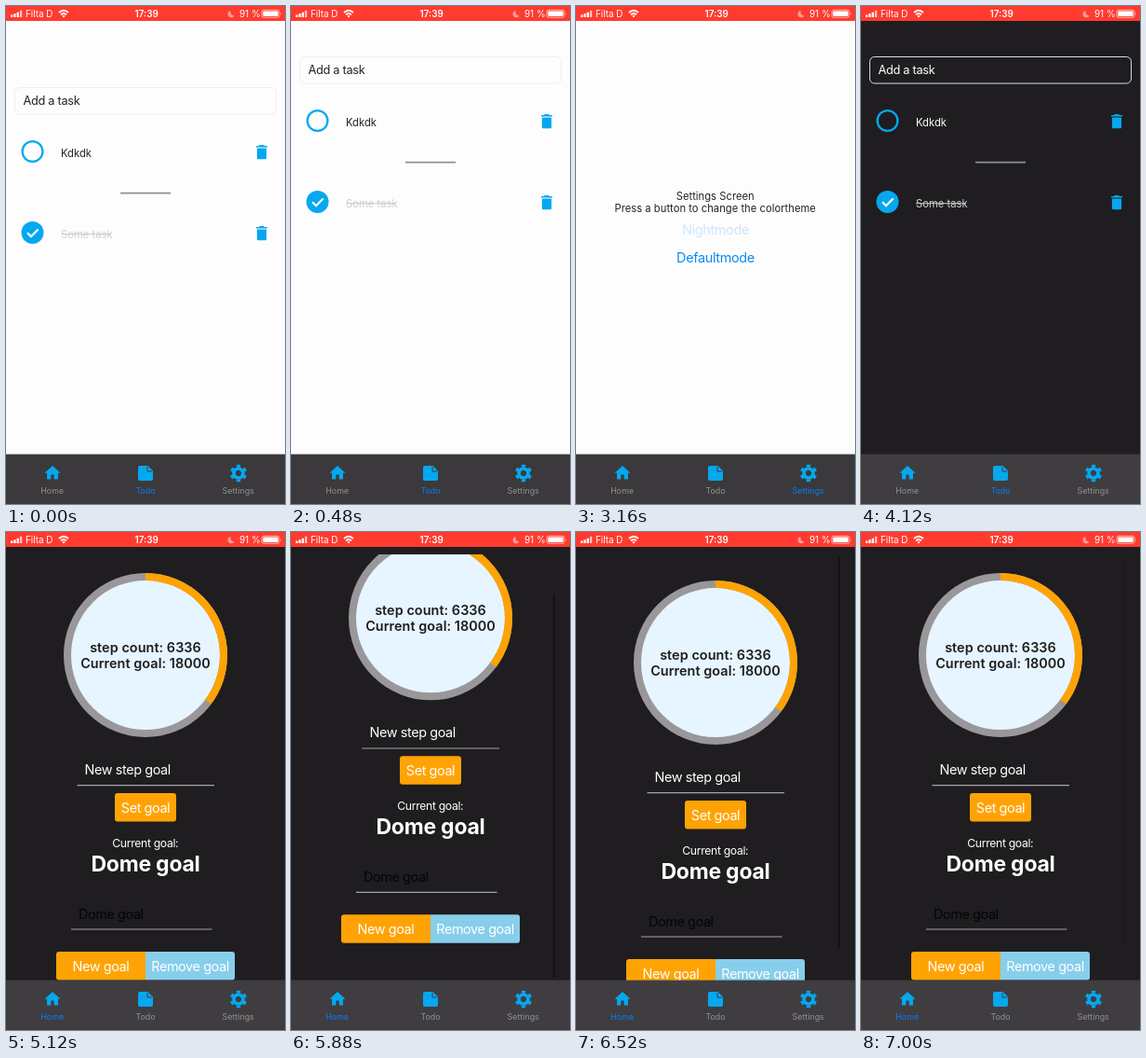
An HTML page that plays this animation: 300 by 534 pixels, repeating every 7080 ms.

```html
<!DOCTYPE html>
<html lang="en">
<head>
<meta charset="utf-8">
<title>Todo and step goals</title>
<style>
  html, body { margin: 0; width: 100%; height: 100%; overflow: hidden; }
  svg { display: block; width: 100vw; height: 100vh;
        font-family: Inter, "Liberation Sans", sans-serif; letter-spacing: -.02em;
        --bg: #fefdfe; --ink: #232225; --bar: #3b393b; --line: #ededf1; --icon: #05a8ef; }
  svg.dark { --bg: #1f1d20; --ink: #fff; --bar: #3f3d40; --line: #dcdcdf; }
  .bg { fill: var(--bg); }
  .ink { fill: var(--ink); }
  .icon { fill: var(--icon); }
  .mid { text-anchor: middle; }
  .small { font-size: 11.2px; letter-spacing: .003em; }
  .field { font-size: 12.8px; }
  .big { font-size: 14.4px; letter-spacing: -.027em; }
  .link { font-size: 14.4px; fill: #088bf2; }
  .steps { font-size: 14.4px; font-weight: 600; letter-spacing: .004em; fill: #1d1c1e; }
  .title { font-size: 23px; font-weight: 700; letter-spacing: -.01em; }
  .tab { font-size: 8.9px; letter-spacing: 0; fill: #929093; }
  .tab.on { fill: #0a7cf5; }
  .status { font-size: 9.9px; letter-spacing: 0; fill: #fff; }
  .clock { font-weight: 600; }
</style>
</head>
<body>
<svg id="app" viewBox="0 0 300 534">
  <defs>
    <path id="trash" class="icon" transform="scale(.85)"
      d="M6 19c0 1.1.9 2 2 2h8c1.1 0 2-.9 2-2V7H6zM19 4h-3.5l-1-1h-5l-1 1H5v2h14z"/>
    <clipPath id="view"><path d="M0 24h300v458H0z"/></clipPath>
  </defs>
  <rect class="bg" width="300" height="534"/>

  <g id="todo">
    <rect x="9.5" y="54.5" width="281" height="28.5" rx="5" fill="none" stroke="var(--line)"/>
    <text class="field ink" x="18.5" y="73">Add a task</text>
    <circle cx="28.5" cy="123" r="10.9" fill="none" stroke="var(--icon)" stroke-width="2.3"/>
    <text class="small ink" x="59" y="128.5">Kdkdk</text>
    <use href="#trash" x="264.8" y="113.5"/>
    <path d="M123 167.6h54" stroke="#8f8f93" stroke-width="1.8"/>
    <circle class="icon" cx="28.5" cy="210" r="12"/>
    <path d="M23 210.3l4 4 7.6-7.8" fill="none" stroke="#fff" stroke-width="2.2"/>
    <text class="small" x="59" y="215.5" fill="#d0d0d2">Some task</text>
    <path d="M59 211.7h54" stroke="#c9c9cb"/>
    <use href="#trash" x="264.8" y="200.5"/>
  </g>

  <g id="settings" class="mid">
    <text class="small ink" x="149.7" y="207.5">Settings Screen</text>
    <text class="small ink" x="149.7" y="221">Press a button to change the colortheme</text>
    <text id="night" class="link" x="150" y="244.5">Nightmode</text>
    <text class="link" x="150" y="274.5">Defaultmode</text>
  </g>

  <g id="home" clip-path="url(#view)">
    <g id="page">
      <circle cx="150" cy="132" r="84" fill="#e6f5ff" stroke="#999799" stroke-width="8"/>
      <circle cx="150" cy="132" r="84" fill="none" stroke="#ffa305" stroke-width="8"
        pathLength="18000" stroke-dasharray="6336 18000" transform="rotate(-90 150 132)"/>
      <g class="mid steps">
        <text x="150" y="128.7">step count: 6336</text>
        <text x="150" y="146">Current goal: 18000</text>
      </g>
      <text class="big" x="84.5" y="260" fill="#fff">New step goal</text>
      <path d="M76.5 271.6h147.5M70 426h151.5" stroke="#a5a4a6" stroke-width="1.1"/>
      <rect x="117" y="280" width="66" height="30.5" rx="3" fill="#ffa305"/>
      <path d="M57 450h93v30.5H57q-3 0-3-3V453q0-3 3-3z" fill="#ffa305"/>
      <path d="M150 450h93q3 0 3 3v24.500q0 3-3 3h-93z" fill="#87ceeb"/>
      <g class="mid big" fill="#fff">
        <text x="150" y="301">Set goal</text>
        <text x="102" y="471">New goal</text>
        <text x="198" y="471">Remove goal</text>
      </g>
      <text class="mid" x="149.8" y="338" font-size="12.2" fill="#fff">Current goal:</text>
      <text class="mid title" x="150" y="364" fill="#fff">Dome goal</text>
      <text class="big" x="78" y="414.5" fill="#050406">Dome goal</text>
    </g>
    <rect id="thumb" x="281.8" width="2.2" rx="1.1" fill="#141215"/>
  </g>

  <rect y="480.6" width="300" height="54" fill="var(--bar)"/>
  <path class="icon" transform="translate(39.8 490.5) scale(.85)" d="M10 20v-6h4v6h5v-8h3L12 3 2 12h3v8z"/>
  <path class="icon" d="M144 493h8.5l5.500 5.500v8.500q0 2-2 2h-12q-2 0-2-2v-12q0-2 2-2z"/>
  <path d="M152 494v5h5" fill="none" stroke="var(--bar)"/>
  <g transform="translate(250 501) rotate(15)" fill="none" stroke="var(--icon)">
    <circle r="5" stroke-width="3.7"/>
    <circle r="7.8" stroke-width="2.8" pathLength="12" stroke-dasharray="1 1"/>
  </g>
  <g class="mid">
    <text class="tab" data-tab="home" x="49.7" y="522.5">Home</text>
    <text class="tab" data-tab="todo" x="150" y="522.5">Todo</text>
    <text class="tab" data-tab="settings" x="249.7" y="522.5">Settings</text>
  </g>

  <rect width="300" height="16" fill="#ff3b30"/>
  <path d="M5 12V9.500h2.300V12zM8.300 12V8.300h2.300V12zM11.600 12V6.700h2.300V12z" fill="#fff"/>
  <path d="M14.900 12V4.800h2.300V12z" fill="#fff" opacity=".7"/>
  <text class="status" x="21" y="12">Filta D</text>
  <path d="M57 7q5-4.500 10 0M59 9.300q3-2.600 6 0" fill="none" stroke="#fff" stroke-width="1.7"/>
  <path d="M60.400 10.700q1.600-1.200 3.200 0L62 12.400z" fill="#fff"/>
  <text class="status clock mid" x="151.2" y="12">17:39</text>
  <path d="M241.500 5a3.700 3.700 0 1 0 4 5.200a4 4 0 0 1-4-5.200z" fill="#fff" opacity=".5"/>
  <text class="status" x="251" y="12">91 %</text>
  <rect x="275" y="4.3" width="19" height="8" rx="2" fill="none" stroke="#fff" stroke-opacity=".6"/>
  <rect x="276.3" y="5.5" width="16.4" height="5.6" rx="1" fill="#fff"/>
  <path d="M295.300 7q1.500 1.300 0 2.700z" fill="#fff" opacity=".6"/>
</svg>
<script>
const LOOP = 7080, STEP = 40;
const $ = id => document.getElementById(id);
const app = $('app'), tabs = document.querySelectorAll('.tab');
const clamp = x => Math.max(0, Math.min(1, x));

// Screen shown from each time on
const screens = [[0, 'todo'], [1920, 'settings'], [4120, 'todo'], [5120, 'home']];

// Release at the end of the page, overshoot at the top, settle
const release = [[6120, 44], [6200, 34], [6320, 3], [6400, -9], [6440, -11],
                 [6520, -8], [6680, -2.5], [6840, 0]];

function along(points, t) {
  const i = points.findIndex(p => p[0] >= t);
  if (i < 0) return points[points.length - 1][1];
  if (i === 0) return points[0][1];
  const [t0, a] = points[i - 1], [t1, b] = points[i];
  return a + (b - a) * (t - t0) / (t1 - t0);
}

function todoPull(t) {
  const w = t * .013;
  return t < 480 ? 33 * (1 + w) * Math.exp(-w) : 0;
}

function homeScroll(t) {
  if (t < 5720) return 0;
  if (t < 6160) return 44 * Math.sin(clamp((t - 5680) / 280) * Math.PI / 2);
  return along(release, t);
}

function nightOpacity(t) {
  if (t < 3160) return 1;
  const k = clamp((t - 3360) / 280);
  return .2 + .8 * k * k * (3 - 2 * k);
}

function draw(t) {
  const screen = screens.filter(s => s[0] <= t).pop()[1];
  for (const id of ['todo', 'settings', 'home']) {
    $(id).style.display = id === screen ? '' : 'none';
  }
  tabs.forEach(el => el.classList.toggle('on', el.dataset.tab === screen));
  app.classList.toggle('dark', t >= 3400);
  $('todo').setAttribute('transform', `translate(0 ${todoPull(t)})`);
  $('night').style.opacity = nightOpacity(t);

  const y = homeScroll(t), top = 27 + Math.max(0, y);
  $('page').setAttribute('transform', `translate(0 ${-y})`);
  $('thumb').setAttribute('y', top);
  $('thumb').setAttribute('height', Math.min(420, 478 - top));
  $('thumb').style.opacity = t < 5720 ? 0 : 1 - .9 * clamp((t - 6840) / 160);
}

let start;
function tick(now) {
  start ??= now;
  const t = (now - start) % LOOP;
  draw(Math.floor(t / STEP) * STEP);
  requestAnimationFrame(tick);
}
draw(0);
requestAnimationFrame(tick);
</script>
</body>
</html>
```
